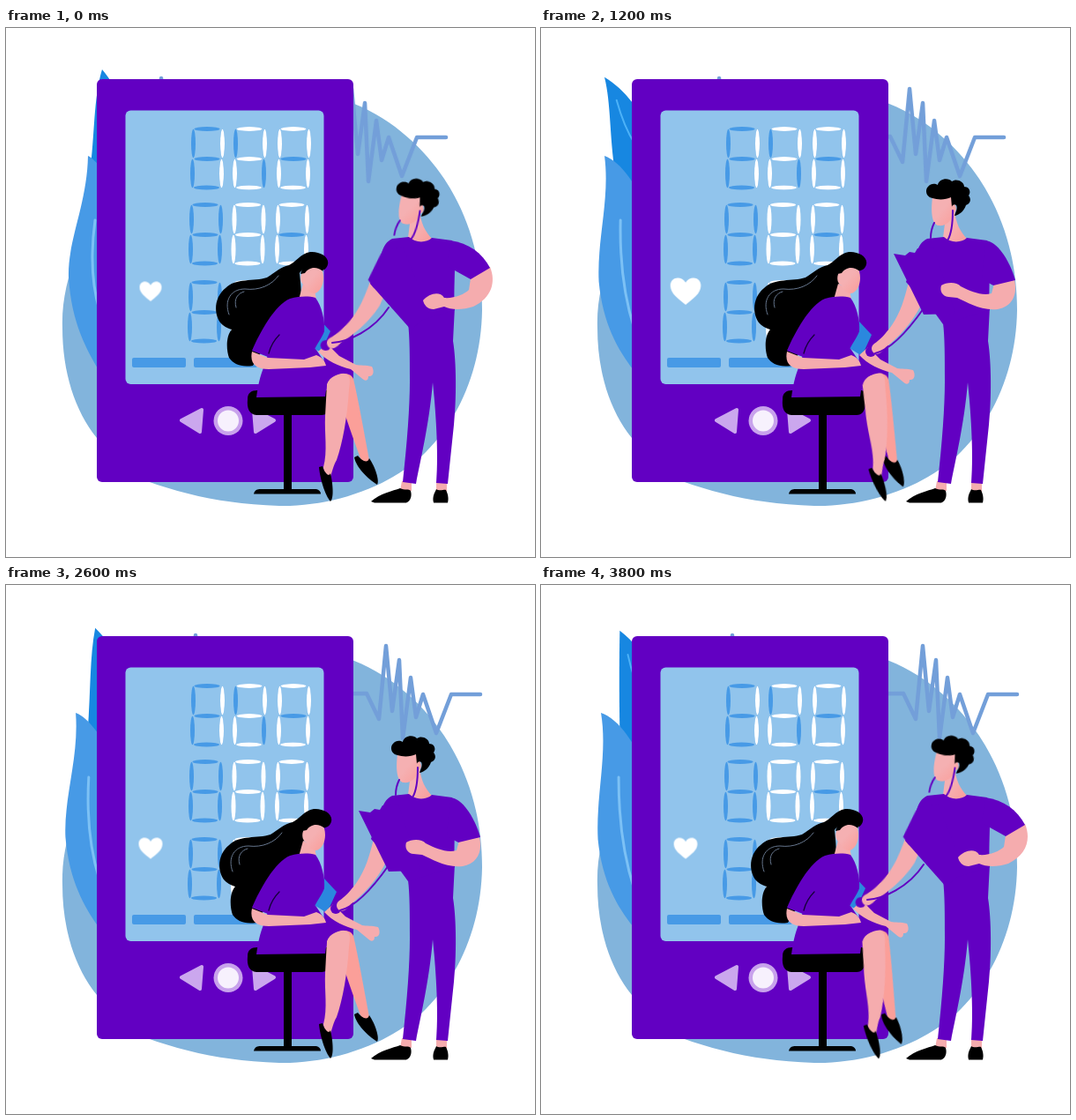
Write an HTML page without scripts that moves like this. It is 600x600 px and loops after 4000 ms.

```html
<!DOCTYPE html>
<html lang="en">
<head>
<meta charset="utf-8">
<title>Blood pressure check</title>
<style>
html, body { margin: 0; width: 100%; height: 100%; overflow: hidden; background: #fff; }
svg { display: block; width: 100%; height: 100%; }
.purple { fill: #6200c2; }
.skin { fill: #f5acae; }
.lit { fill: #fff; }
.dim { fill: #479ae6; }
.line { fill: none; stroke-linecap: round; stroke-linejoin: round; }
.tube { stroke: #6200c2; stroke-width: 2; }

.pulse, .wave, .shin, .calf, .hair, .face, .reach, .head, .near { animation: 4s linear infinite; }
.pulse { animation-name: pulse; transform-origin: 164px 299px; }
.wave { animation-name: wave; }
.shin { animation-name: shin; transform-origin: 378px 400px; }
.calf { animation-name: calf; transform-origin: 388px 400px; }
.hair { animation-name: hair; }
.face { animation-name: face; }
.reach { animation-name: reach; }
.head { animation-name: head; transform-origin: 465px 225px; }
.near { animation-name: near; transform-origin: 435px 255px; }
.hair, .face, .reach, .head, .near { animation-timing-function: ease-in-out; }

@keyframes pulse {
  0% { transform: scale(.83); animation-timing-function: cubic-bezier(.6,0,.72,1); }
  32.5%, 82.5% { transform: scale(1.16); animation-timing-function: cubic-bezier(.37,0,.63,1); }
  57.5% { transform: scale(.83); animation-timing-function: cubic-bezier(.37,0,.63,1); }
  82.5% { animation-timing-function: cubic-bezier(.75,0,.85,1); }
  100% { transform: scale(.83); }
}
@keyframes wave {
  0% { transform: translateX(-41px); }
  20% { transform: translateX(-23px); }
  30% { transform: translateX(-15px); }
  50% { transform: translateX(-6px); }
  65% { transform: translateX(-2px); }
  85%, 100% { transform: none; }
}
@keyframes shin {
  0%, 50%, 65% { transform: rotate(0deg); }
  10% { transform: rotate(-1deg); }
  20%, 75% { transform: rotate(-5deg); }
  30% { transform: rotate(-9.5deg); }
  40% { transform: rotate(-5deg); }
  85% { transform: rotate(-7.5deg); }
  95% { transform: rotate(-6.3deg); }
  100% { transform: rotate(-2deg); }
}
@keyframes calf {
  0%, 50%, 65% { transform: rotate(0deg); }
  10% { transform: rotate(4.5deg); }
  20%, 85% { transform: rotate(9deg); }
  30%, 75% { transform: rotate(5deg); }
  40% { transform: rotate(1.5deg); }
  95% { transform: rotate(6deg); }
  100% { transform: rotate(3deg); }
}
@keyframes hair { 0%, 93%, 100% { transform: translateX(-4px); } 20%, 79% { transform: none; } }
@keyframes face { 0%, 93%, 100% { transform: translateX(-2px); } 20%, 79% { transform: none; } }
@keyframes reach { 0%, 93%, 100% { transform: translate(-7px, -4px); } 20%, 79% { transform: none; } }
@keyframes head { 0%, 93%, 100% { transform: rotate(8deg); } 20%, 79% { transform: rotate(0deg); } }
@keyframes near { 0%, 93%, 100% { transform: rotate(6deg); } 20%, 79% { transform: rotate(0deg); } }
</style>
</head>
<body>
<svg viewBox="0 0 600 600">
<defs>
  <linearGradient id="blush" x1="0" y1="0" x2="1" y2="1">
    <stop offset=".45" stop-color="#f5b0b2"/><stop offset="1" stop-color="#fa9d99"/>
  </linearGradient>
  <ellipse id="h" rx="14.500" ry="2.500"/>
  <ellipse id="v" rx="2.500" ry="16.300"/>
  <g id="one"><use href="#v" x="36.500" y="19"/><use href="#v" x="35.500" y="53"/></g>
  <g id="ends"><use href="#h" x="19" y="2.500"/><use href="#h" x="18.500" y="69"/></g>
  <g id="two">
    <use href="#ends"/><use href="#h" x="19" y="36.500"/>
    <use href="#v" x="36.500" y="19"/><use href="#v" x="2.500" y="53"/>
  </g>
  <g id="zero">
    <use href="#ends"/><use href="#one"/>
    <use href="#v" x="3.500" y="19"/><use href="#v" x="2.500" y="53"/>
  </g>
  <g id="eight"><use href="#zero"/><use href="#h" x="19" y="36.500"/></g>
</defs>

<rect width="600" height="600" fill="#fff"/>
<path fill="#82b4dc" d="M64 340C63 310 70 280 82 252C110 190 200 75 320 75C350 75 375 77 395 86C440 104 475 138 497 171C524 212 540 262 540 320C539 385 515 445 470 487C428 524 365 543 310 542C250 540 205 530 160 514C138 501 118 484 103 465C78 434 64 390 64 340Z"/>

<!-- leaves -->
<path fill="#1787e1">
  <animate attributeName="d" dur="4s" repeatCount="indefinite" calcMode="spline"
    keyTimes="0;.325;.575;.825;1" keySplines=".6 0 .72 1;.37 0 .63 1;.37 0 .63 1;.75 0 .85 1"
    values="M109 47C99 80 101 120 95 165L97 230L130 230L130 80C124 68 118 58 109 47Z;M71 56C79 85 77 125 84 165L90 230L130 230L130 125C112 95 95 70 71 56Z;M109 47C99 80 101 120 95 165L97 230L130 230L130 80C124 68 118 58 109 47Z;M71 56C79 85 77 125 84 165L90 230L130 230L130 125C112 95 95 70 71 56Z;M109 47C99 80 101 120 95 165L97 230L130 230L130 80C124 68 118 58 109 47Z"/>
</path>
<path class="line" stroke="#4cb2f8" stroke-width="2">
  <animate attributeName="d" dur="4s" repeatCount="indefinite" calcMode="spline"
    keyTimes="0;.325;.575;.825;1" keySplines=".6 0 .72 1;.37 0 .63 1;.37 0 .63 1;.75 0 .85 1"
    values="M113 76C115 90 118 105 122 115;M85 82C90 100 97 118 106 132;M113 76C115 90 118 105 122 115;M85 82C90 100 97 118 106 132;M113 76C115 90 118 105 122 115"/>
</path>
<path class="dim">
  <animate attributeName="d" dur="4s" repeatCount="indefinite" calcMode="spline"
    keyTimes="0;.2375;.4;.5625;.7275;.895;1" keySplines=".37 0 .63 1;.37 0 .63 1;.37 0 .63 1;.37 0 .63 1;.37 0 .63 1;.8 0 .9 1"
    values="M93 145C92 200 70 240 71 282C74 335 92 365 105 388L130 388L130 190C112 165 103 150 93 145Z;M62 145C72 190 60 240 63 290C68 335 85 365 105 388L130 388L130 240C105 180 85 153 62 145Z;M93 145C92 200 70 240 71 282C74 335 92 365 105 388L130 388L130 190C112 165 103 150 93 145Z;M62 145C72 190 60 240 63 290C68 335 85 365 105 388L130 388L130 240C105 180 85 153 62 145Z;M93 145C92 200 70 240 71 282C74 335 92 365 105 388L130 388L130 190C112 165 103 150 93 145Z;M62 145C72 190 60 240 63 290C68 335 85 365 105 388L130 388L130 240C105 180 85 153 62 145Z;M93 145C92 200 70 240 71 282C74 335 92 365 105 388L130 388L130 190C112 165 103 150 93 145Z"/>
</path>
<path class="line" stroke="#7cc1f5" stroke-width="3">
  <animate attributeName="d" dur="4s" repeatCount="indefinite" calcMode="spline"
    keyTimes="0;.2375;.4;.5625;.7275;.895;1" keySplines=".37 0 .63 1;.37 0 .63 1;.37 0 .63 1;.37 0 .63 1;.37 0 .63 1;.8 0 .9 1"
    values="M101 218C96 255 97 290 106 320;M85 218C86 262 92 310 106 352;M101 218C96 255 97 290 106 320;M85 218C86 262 92 310 106 352;M101 218C96 255 97 290 106 320;M85 218C86 262 92 310 106 352;M101 218C96 255 97 290 106 320"/>
</path>

<!-- heart trace -->
<polyline class="line wave" stroke="#739fd9" stroke-width="4.500" points="211,124 217,57 223,124 411,123 425,152 433,69 440,143 448,85 452,174 461,105 467,150 475,124 490,168 507,124 540,124"/>

<!-- monitor -->
<rect class="purple" x="103" y="58" width="291" height="457" rx="6"/>
<rect x="135.500" y="93.500" width="225" height="310.500" rx="6" fill="#91c4ec"/>
<g class="dim">
  <use href="#eight" x="209" y="112"/><use href="#eight" x="257" y="112"/><use href="#eight" x="307" y="112"/>
  <use href="#eight" x="207" y="198"/><use href="#eight" x="305" y="198"/>
  <use href="#eight" x="206" y="286"/>
  <rect x="143" y="374" width="61" height="11" rx="2"/><rect x="213" y="374" width="72" height="11" rx="2"/>
</g>
<g class="lit">
  <use href="#one" x="209" y="112"/><use href="#two" x="257" y="112"/><use href="#zero" x="307" y="112"/>
  <use href="#eight" x="255.500" y="198"/><use href="#zero" x="305" y="198"/>
  <use href="#eight" x="255" y="286"/>
  <path class="pulse" d="M164 312C157 306 149 301 149 293C149 284 160 283 164 290C168 283 179 284 179 293C179 301 171 306 164 312Z"/>
</g>
<g fill="#cba7ee" stroke="#cba7ee" stroke-width="4" stroke-linejoin="round">
  <path d="M199 445L222 433L220 458Z"/><path d="M304 445L281 433L283 458Z"/>
</g>
<circle cx="252" cy="445.500" r="16.500" fill="#c8a2ec"/>
<circle cx="252" cy="445.500" r="12" fill="#f7f1fd"/>

<!-- stool -->
<path d="M274 421C274 414 278 411 285 411H364C369 412 369 420 368 427C367 435 364 439 358 439H284C276 438 273 432 274 421Z"/>
<rect x="315" y="436" width="9" height="90"/>
<path d="M281 528.500C282 524 285 523 289 523H350C354 523 357 525 357 528.500Z"/>

<!-- seated woman -->
<g class="calf">
  <path fill="#fb9f99" d="M376 395C384 390 392 392 394 398C400 424 406 458 412 490C409 495 404 493 402 488C394 465 384 440 378 415Z"/>
  <path d="M395 487C397 498 410 511 421 518C424 514 419 498 412 488C410 495 403 490 399 485Z"/>
</g>
<g class="shin">
  <path class="skin" d="M364 403C368 394 377 391 384 392C390 393 391 398 389 410C387 442 382 470 375 490C371 497 370 503 368 509C363 508 360 503 360 498C365 480 361 460 362 440Z"/>
  <path d="M355 498C356 511 362 530 368 537C372 534 371 518 368 505C366 510 361 504 359 497Z"/>
</g>
<path class="purple" d="M300 362L350 362L366 386L393 391C380 390 367 395 364 404L362 418L284 419C286 405 288 395 293 383Z"/>
<g class="reach">
  <path fill="#2b88de" d="M352 326L361 333L375 348L364 372L348 362Z"/>
  <path class="skin" d="M361 371C370 381 385 388 398 391L409 400C414 405 418 405 418 399C424 400 425 393 422 388C415 386 409 387 404 386L385 376L371 362Z"/>
</g>
<g class="hair">
  <path d="M369 268C371 259 359 253 349 254C338 256 332 266 325 269C315 271 310 277 300 283C285 288 265 283 253 295C239 306 239 328 250 337C254 340 257 341 260 342C253 350 254 366 257 374C262 381 270 385 284 383L310 340L337 310C340 300 338 290 337 278C341 272 348 269 353 272C360 277 367 276 369 268Z"/>
  <path class="line" stroke="#65758c" stroke-width="1" d="M257 325C251 309 259 296 275 296C291 298 305 292 313 281M265 317C262 307 267 301 274 299"/>
</g>
<path class="skin" d="M337 290L332 308H352L350 297Z"/>
<path class="purple" d="M322 307C334 304 343 304 351 306C358 315 362 332 361 344C358 353 350 361 348 370L350 382H292L297 373L279 366C288 345 305 314 322 307Z"/>
<path class="line" stroke="#16003a" stroke-width="1.300" d="M298 369C300 361 304 354 310 348"/>
<g class="face">
  <path fill="url(#blush)" d="M339 276C346 269 357 270 361 276C364 287 360 299 352 301C346 301 342 297 341 292C335 290 335 280 339 276Z"/>
  <path d="M336 279C338 270 347 263 357 266L362 276C353 269 345 272 341 278Z"/>
</g>
<path class="skin" d="M279 367L297 374L338 376L352 371C358 373 362 378 363 383L345 385L298 387C284 387 276 381 279 367Z"/>

<!-- standing man -->
<path class="skin" d="M449 514H460V525H447ZM488 514H500V526H488Z"/>
<path d="M414 537C424 528 439 525 447 522C452 525 457 522 459 525C461 532 458 537 454 538.500H418ZM485 538.500C483 531 487 526 488 523C492 526 497 523 499 524C502 530 502 535 501 538.500Z"/>
<path class="purple" d="M454 318L509 316L507 355C511 380 511 420 508 450L501 517L488 516C491 480 487 430 484 402C480 450 470 490 465 517L450 515C455 470 458 430 458 400C458 375 458 350 456 335Z"/>
<g class="near">
  <circle class="purple" cx="374" cy="367" r="6"/>
  <path class="skin" d="M417 288C412 308 408 322 398 337C390 348 384 354 378 358C374 361 374 366 378 369C383 372 388 366 391 362C402 354 420 336 430 316L436 298Z"/>
  <path class="purple" d="M440 239C428 243 424 262 414 288L421 296L434 300L450 260Z"/>
</g>
<path class="line tube">
  <animate attributeName="d" dur="4s" repeatCount="indefinite" calcMode="spline"
    keyTimes="0;.2;.79;.93;1" keySplines=".42 0 .58 1;0 0 1 1;.42 0 .58 1;0 0 1 1"
    values="M370 357C388 356 417 343 434 317;M379 369C395 365 415 345 434 318;M379 369C395 365 415 345 434 318;M370 357C388 356 417 343 434 317;M370 357C388 356 417 343 434 317"/>
</path>
<path fill="url(#blush)" d="M459 214L456 238C462 245 476 244 483 239C476 231 470 222 469 205Z"/>
<path class="purple" d="M438 239L457 237C464 244 477 244 483 238L506 241C512 260 507 290 509 320L456 336L430 300L426 256C428 247 432 242 438 239Z"/>
<path class="purple">
  <animate attributeName="d" dur="4s" repeatCount="indefinite" calcMode="spline"
    keyTimes="0;.135;.3;.79;.94;1" keySplines="0 0 1 1;.37 0 .63 1;0 0 1 1;.37 0 .63 1;0 0 1 1"
    values="M413 290L460 343L480 322L450 248L430 252L425 262L421 271L417 280Z;M413 290L460 343L480 322L450 248L430 252L425 262L421 271L417 280Z;M400 256L434 325L470 324L445 248L427 250L424 255L418 254L413 258Z;M400 256L434 325L470 324L445 248L427 250L424 255L418 254L413 258Z;M413 290L460 343L480 322L450 248L430 252L425 262L421 271L417 280Z;M413 290L460 343L480 322L450 248L430 252L425 262L421 271L417 280Z"/>
</path>
<path class="skin">
  <animate attributeName="d" dur="4s" repeatCount="indefinite" calcMode="spline"
    keyTimes="0;.135;.3;.79;.94;1" keySplines="0 0 1 1;.37 0 .63 1;0 0 1 1;.37 0 .63 1;0 0 1 1"
    values="M549 271C556 288 551 306 530 316C518 320 505 320 497 316L485 319C478 319 474 314 473 309C480 301 492 298 497 306C508 307 520 302 525 297L527 284Z;M549 271C556 288 551 306 530 316C518 320 505 320 497 316L485 319C478 319 474 314 473 309C480 301 492 298 497 306C508 307 520 302 525 297L527 284Z;M537 286C541 303 534 316 518 319C498 321 484 311 472 306L462 305C455 304 452 298 454 292C460 288 472 288 476 293C488 299 500 304 511 301L514 290Z;M537 286C541 303 534 316 518 319C498 321 484 311 472 306L462 305C455 304 452 298 454 292C460 288 472 288 476 293C488 299 500 304 511 301L514 290Z;M549 271C556 288 551 306 530 316C518 320 505 320 497 316L485 319C478 319 474 314 473 309C480 301 492 298 497 306C508 307 520 302 525 297L527 284Z;M549 271C556 288 551 306 530 316C518 320 505 320 497 316L485 319C478 319 474 314 473 309C480 301 492 298 497 306C508 307 520 302 525 297L527 284Z"/>
</path>
<path class="purple">
  <animate attributeName="d" dur="4s" repeatCount="indefinite" calcMode="spline"
    keyTimes="0;.135;.3;.79;.94;1" keySplines="0 0 1 1;.37 0 .63 1;0 0 1 1;.37 0 .63 1;0 0 1 1"
    values="M504 241C525 244 540 255 549 272L527 285L500 270Z;M504 241C525 244 540 255 549 272L527 285L500 270Z;M504 241C517 242 531 262 538 286L513 292L500 285Z;M504 241C517 242 531 262 538 286L513 292L500 285Z;M504 241C525 244 540 255 549 272L527 285L500 270Z;M504 241C525 244 540 255 549 272L527 285L500 270Z"/>
</path>
<g class="head">
  <path fill="url(#blush)" d="M444 192L466 190L470 202C472 206 470 210 467 210C466 220 458 225 451 224C443 223 442 208 444 192Z"/>
  <path d="M444 193C437 192 435 184 439 180C442 176 447 176 450 178C451 171 462 169 466 174C471 170 480 174 480 180C486 180 488 186 485 190C489 195 486 200 482 201C480 207 475 212 469 213C470 209 473 205 471 201C469 199 466 201 466 203L465 192C459 195 450 195 444 193Z"/>
  <path class="line tube" d="M446 221C443 227 442 233 442 238M467 207C467 222 466 233 461 241"/>
</g>
</svg>
</body>
</html>
```
